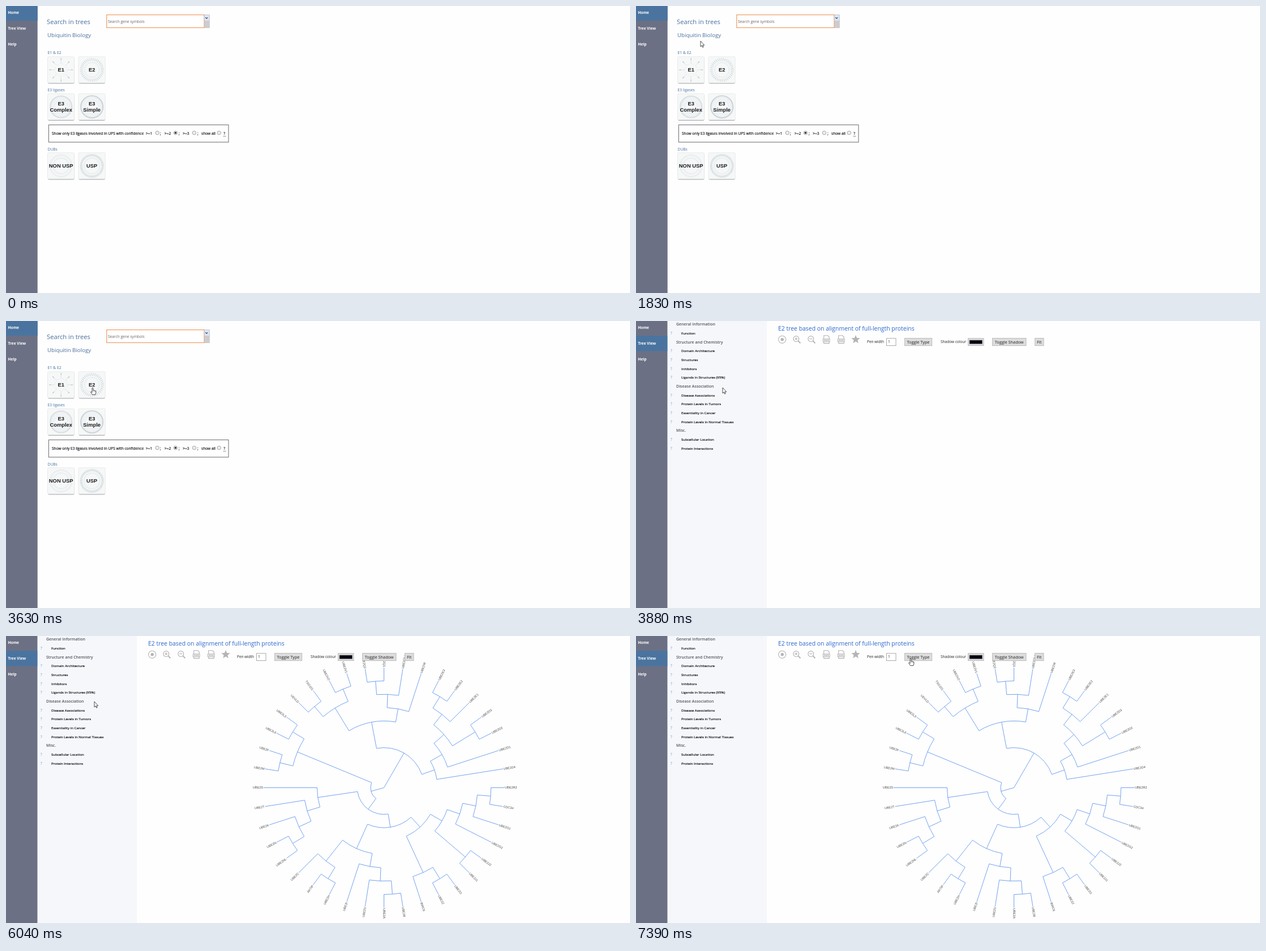
Recreate the animation shown at these times as an HTML page. Size 1102 px wide and 508 px high, loop 8 s.

```html
<!DOCTYPE html>
<html lang="en">
<head>
<meta charset="utf-8">
<title>Tree browser</title>
<style>
  html, body { margin: 0; width: 100%; height: 100%; overflow: hidden; background: #fefefe; }
  svg { display: block; width: 1102px; height: 508px; }
  text { font-family: "Open Sans", "Noto Sans", sans-serif; }
  .arial { font-family: "Liberation Sans", Arial, sans-serif; }
  .firm { stroke: #15171c; stroke-width: .18px; }
</style>
</head>
<body>
<svg id="stage" viewBox="0 0 1102 508" xmlns="http://www.w3.org/2000/svg"></svg>
<script>
const LOOP = 8000;
const BLUE = '#47709f', LINE = '#5a92ee', GREY = '#b4b4b4', INK = '#15171c';

const text = (x, y, size, fill, str, more = '') =>
  `<text x="${x}" y="${y}" font-size="${size}" fill="${fill}" ${more}>${str}</text>`;
const rect = (x, y, w, h, fill, more = '') =>
  `<rect x="${x}" y="${y}" width="${w}" height="${h}" fill="${fill}" ${more}/>`;
const ring = (x, y, r, stroke, width, more = '') =>
  `<circle cx="${x}" cy="${y}" r="${r}" fill="none" stroke="${stroke}" stroke-width="${width}" ${more}/>`;
const path = (d, stroke, width, fill = 'none', more = '') =>
  `<path d="${d}" stroke="${stroke}" stroke-width="${width}" fill="${fill}" ${more}/>`;
const group = (id, body, more = '') => `<g id="${id}" ${more}>${body}</g>`;

// Side navigation
function sidebar() {
  const items = ['Home', 'Tree View', 'Help'];
  return rect(0, 0, 55.7, 508, '#6c7084') +
    rect(0, 0, 55.7, 26, '#4a749f', 'id="active"') +
    items.map((s, i) => text(3.5, 14.2 + i * 27.8, 6.6, '#fff', s, 'font-weight="700"')).join('');
}

// Home page
function tile(x, y, lines, art) {
  const cx = x + 23.2, cy = y + 23;
  const label = lines.map((s, i) =>
    text(cx, cy + 3.3 + (i - (lines.length - 1) / 2) * 11, 9.4, '#1b1b1f', s,
      'class="arial" font-weight="700" text-anchor="middle"')).join('');
  return rect(x, y + 1, 46.5, 46.5, '#a5a8aa', 'rx="2.5"') +
    rect(x - .5, y - .3, 47.2, 46.5, '#f6f8f8', 'rx="2" stroke="#dde0e1" stroke-width=".6"') +
    art(cx, cy) + label;
}

function spokes(cx, cy) {
  let out = '';
  for (let i = 0; i < 8; i++) {
    out += `<g transform="translate(${cx} ${cy}) rotate(${i * 45})">` +
      path('M11 0H18', '#ccd5dc', .6) + path('M17.5 0H21', '#a9b4bc', 1) +
      path('M11 0A11 11 0 0 1 9.5 5.5', '#dbe2e6', .5) + '</g>';
  }
  return out;
}
const ticks = (cx, cy) =>
  ring(cx, cy, 18.5, '#cbd3d8', 5, 'stroke-dasharray="1 2.05"') +
  ring(cx, cy, 13, '#e1e8ec', 2, 'stroke-dasharray="2 1.4"');
const band = (strong, r = 19) => (cx, cy) =>
  ring(cx, cy, r, strong, 2.2) +
  ring(cx, cy, r - 3, '#e4eaee', 3, 'stroke-dasharray="1 1"') +
  ring(cx, cy, r - 7, '#edf1f4', 3);
const dashed = (color, width) => (cx, cy) =>
  ring(cx, cy, 19, color, width, 'stroke-dasharray="1 1.2"') +
  ring(cx, cy, 14, '#e4eaed', 2.5, 'stroke-dasharray="1.5 1"');

function radio(x, on) {
  return `<circle cx="${x}" cy="224.5" r="3.2" fill="#eee" stroke="#8e8e8e" stroke-width=".8"/>` +
    (on ? `<circle cx="${x}" cy="224.5" r="1.8" fill="#333"/>` : '');
}

function home() {
  const note = (x, s) => text(x, 228.4, 6.6, INK, s, 'class="firm"');
  return text(72, 32, 11.2, BLUE, 'Search in trees') +
    rect(177.8, 15.6, 172.2, 22.8, '#fff', 'stroke="#ee9c64" stroke-width="1.2"') +
    text(180, 30.4, 6.6, '#6c6468', 'Search gene symbols') +
    rect(350.5, 15.5, 8.8, 23.2, '#cfcccd', 'stroke="#bdbdc2" stroke-width=".6"') +
    rect(350.8, 16, 8, 10, '#dbe6f4') +
    path('M352.2 20.2L354.2 22.2L356.2 20.2', '#34507f', 1.3) +
    text(73, 54.8, 9.7, BLUE, 'Ubiquitin Biology') +
    text(73.5, 85.4, 6.9, BLUE, 'E1 &amp; E2') +
    text(73.5, 151.2, 6.7, BLUE, 'E3 ligases') +
    text(73.5, 255.6, 6.7, BLUE, 'DUBs') +
    tile(74, 90, ['E1'], spokes) + tile(128.5, 90, ['E2'], ticks) +
    tile(74, 155.5, ['E3', 'Complex'], band('#d9dee1')) +
    tile(128.5, 155.5, ['E3', 'Simple'], band('#cdd3d7', 19.5)) +
    tile(74, 260, ['NON USP'], dashed('#dfe4e6', 3)) +
    tile(128.5, 260, ['USP'], dashed('#c6cfd3', 4)) +
    rect(75.4, 210.4, 317.6, 30.6, '#fefefe', 'stroke="#77777c" stroke-width="1.1"') +
    note(81, 'Show only E3 ligases involved in UPS with confidence') +
    note(247, '&gt;=1') + note(272, ';') + note(280, '&gt;=2') + note(305, ';') +
    note(312.3, '&gt;=3') + note(338, ';') + note(345, 'show all') + note(384.3, '?') +
    radio(267.2) + radio(299.4, true) + radio(332.4) + radio(376.3) +
    path('M384 230.5H388.3', INK, .8, 'none', 'stroke-dasharray="1 .7"');
}

// Tree page: side panel and toolbar
function panel() {
  const rows = ['#General Information', 'Function', '#Structure and Chemistry', 'Domain Architecture',
    'Structures', 'Inhibitors', 'Ligands in Structures (95%)', '#Disease Association',
    'Disease Associations', 'Protein Levels in Tumors', 'Essentiality in Cancer',
    'Protein Levels in Normal Tissues', '#Misc.', 'Subcellular Location', 'Protein Interactions'];
  return rect(55.7, 0, 175.3, 508, '#f5f7fa') + rows.map((s, i) => {
    const y = 8.2 + i * 15.68;
    return s[0] === '#'
      ? text(71, y, 7, '#50545e', s.slice(1), 'font-weight="600"')
      : text(61, y, 6.3, '#5c8be4', '?') + text(80, y, 6.15, INK, s, 'class="firm"');
  }).join('');
}

function button(x, w, s) {
  return rect(x, 30.5, w, 13.2, '#dcdcdc', 'stroke="#b4b4b4" stroke-width=".8"') +
    text(x + w / 2, 39.7, 7.3, '#222', s, 'text-anchor="middle"');
}

function icons() {
  const at = (x, body) => `<g transform="translate(${x} 32.8)">${body}</g>`;
  const lens = sign => ring(-1.2, -1.2, 4.9, GREY, 1.2) +
    path('M2.6 2.6L6.4 6.4', GREY, 2) + path(sign, GREY, 1.1);
  const file = path('M-4.5 -1V-7H2.5L5 -4.5V-1M-4.5 4V6.8H5V4', GREY, 1.1) +
    rect(-5.9, -1, 11.8, 5, '#f2f2f2', `stroke="${GREY}" stroke-width="1"`) +
    path('M-4 1.5H4', GREY, 2, 'none', 'stroke-dasharray="2 1"');
  let star = '';
  for (let i = 0; i < 10; i++) {
    const a = i * Math.PI / 5 - Math.PI / 2, r = i % 2 ? 3.5 : 8;
    star += (i ? 'L' : 'M') + (r * Math.cos(a)).toFixed(2) + ' ' + (r * Math.sin(a)).toFixed(2);
  }
  return at(258.2, ring(0, 0, 6.6, GREY, 1.1) + `<circle r="2.7" fill="${GREY}"/>`) +
    at(284, lens('M-3.7 -1.2H1.3M-1.2 -3.7V1.3')) + at(310, lens('M-3.7 -1.2H1.3')) +
    at(336.2, file) + at(362.2, file) + at(388, path(star + 'Z', 'none', 0, GREY));
}

function toolbar() {
  return text(251, 17.4, 10.45, '#2b68cf', 'E2 tree based on alignment of full-length proteins') +
    icons() +
    text(408, 39.4, 6.45, '#222', 'Pen width') +
    rect(442.4, 30.8, 16.6, 12.8, '#fff', 'stroke="#a0a0a0" stroke-width=".9"') +
    text(445, 39.4, 6.6, '#222', '1') +
    button(474.3, 48.4, 'Toggle Type') +
    text(538, 39.4, 6.5, '#222', 'Shadow colour') +
    rect(586.4, 30.8, 27.6, 12.8, '#dcdcdc', 'stroke="#b0b0b0" stroke-width=".8"') +
    rect(589, 34, 22.4, 6.4, '#070712', 'stroke="#777" stroke-width=".6"') +
    button(629.4, 59.6, 'Toggle Shadow') + button(704.4, 15.6, 'Fit');
}

// Radial cladogram: leaves are evenly spaced, radius falls with node height
const labels = ('UBE2R2 CDC34 UBE2G1 UBE2G2 UBE2J2 UBE2J1 UBE2O UBE2Z BIRC6 UBE2B UBE2A UBE2U UBE2I UBE2H ' +
  'AKTIP UBE2C UBE2NL UBE2N UBE2K UBE2T UBE2S UBE2M UBE2F UBE2L6 UBE2L3 UEVLD TSG101 UBE2V2 UBE2V1 ' +
  'UBE2Q2 UBE2Q1 UBE2QL1 UBE2W UBE2E3 UBE2E2 UBE2E1 UBE2D3 UBE2D2 UBE2D1 UBE2D4').split(' ');
const clades = [
  [
    [
      [20, [19, [18, [17, 16]]]],
      [
        [[15, [14, 13]], [12, [11, [10, 9]]]],
        [[8, [7, 6]], [[5, 4], [3, [2, [1, 0]]]]]
      ]
    ],
    [[21, 22], [23, 24]]
  ],
  [
    [[[25, 26], [27, 28]], [[[29, 30], 31], 32]],
    [[[[[33, 34], 35], [36, 37]], 38], 39]
  ]
];

function tree() {
  const CX = 667.5, CY = 268.5, R = 212.6, DEPTH = 9;
  const point = (r, slot) => {
    const a = slot * Math.PI * 2 / labels.length;
    return (CX + r * Math.cos(a)).toFixed(2) + ' ' + (CY + r * Math.sin(a)).toFixed(2);
  };
  let d = '';
  function place(node) {
    if (!Array.isArray(node)) return { slot: node, h: 0, r: R };
    const kids = node.map(place).sort((a, b) => a.slot - b.slot);
    const h = 1 + Math.max(...kids.map(k => k.h));
    const r = R * (1 - h / DEPTH);
    const [a, b] = kids;
    if (r > 0) d += `M${point(r, a.slot)}A${r} ${r} 0 0 1 ${point(r, b.slot)}`;
    for (const k of kids) d += `M${point(r, k.slot)}L${point(k.r, k.slot)}`;
    return { slot: (a.slot + b.slot) / 2, h, r };
  }
  place(clades);
  const names = labels.map((s, i) => {
    const deg = i * 360 / labels.length, flip = deg > 90 && deg <= 270;
    const turn = `translate(${CX} ${CY}) rotate(${flip ? deg - 180 : deg})`;
    return text(flip ? -R - 1 : R + 1, 1.9, 5.5, '#484848', s,
      `class="arial" transform="${turn}" text-anchor="${flip ? 'end' : 'start'}"`);
  }).join('');
  return path(d, LINE, .85) + names;
}

// Pointer and tooltip
const arrow = path('M0 0V10L2.2 7.9L3.8 11.2L5.2 10.5L3.8 7.3H6.7Z', '#222', .8, '#fff');
const hand = path('M-1 1C-1 -.4 1 -.4 1 1V4.8L2.4 4.6L2.9 5.1L4.2 5L4.7 5.6L5.8 6V9L4.8 12.4H-.5' +
  'L-3.3 8.4C-3.8 7.2 -2.6 6.8 -2 7.5L-1 8.6Z', '#222', .8, '#fff') +
  path('M1 4.8V7M2.9 5.1V7.2M4.7 5.6V7.4', '#444', .5);

document.getElementById('stage').innerHTML =
  '<clipPath id="below"><rect x="231" y="34.5" width="871" height="474"/></clipPath>' +
  rect(0, 0, 1102, 508, '#fefefe') + sidebar() +
  group('home', home()) +
  group('view', panel() + group('tree', tree(), 'clip-path="url(#below)"') + toolbar()) +
  group('tip', rect(161.4, 127.6, 22.4, 14.2, '#eaf2fc', 'rx="1" stroke="#8aa2c6" stroke-width="1"') +
    text(164.5, 137.2, 6.2, '#566070', 'E2')) +
  group('click', '<circle cx="152" cy="118" r="6.5" fill="#888" fill-opacity=".22"/>') +
  group('pointer', group('arrow', arrow) + group('hand', hand));

const $ = Object.fromEntries(
  ['active', 'home', 'view', 'tree', 'tip', 'click', 'pointer', 'arrow', 'hand']
    .map(id => [id, document.getElementById(id)]));

// Pointer moves: start time, step length, then [step, x, y]
const moves = [
  { start: 1380, step: 63.1, keys: [[0, 48, 2], [3, 72, 23], [7, 114, 62], [10, 149, 94],
    [12, 166, 109], [14, 148, 116], [16, 153, 118]] },
  { start: 6040, step: 64.25, keys: [[0, 156, 116], [2, 180, 113], [4, 223, 108], [8, 327, 98],
    [12, 411, 91], [15, 452, 69], [18, 476, 49], [21, 485, 40]] }
];

function pointerAt(t) {
  const move = moves.filter(m => t >= m.start).pop();
  if (!move) return null;
  const { keys } = move, last = keys[keys.length - 1];
  const n = Math.floor((t - move.start) / move.step + 1e-6);
  if (n >= last[0]) return last.slice(1);
  const i = keys.findIndex(k => k[0] > n);
  const [n0, x0, y0] = keys[i - 1], [n1, x1, y1] = keys[i];
  const f = (n - n0) / (n1 - n0);
  return [x0 + (x1 - x0) * f, y0 + (y1 - y0) * f];
}

const show = (el, on) => el.setAttribute('visibility', on ? 'visible' : 'hidden');

function draw(t) {
  const inTree = t >= 3880;
  show($.home, !inTree);
  show($.view, inTree);
  show($.tree, t >= 3950);
  show($.tip, t >= 2390 && t < 3450);
  show($.click, t >= 3450 && t < 3630);
  $.active.setAttribute('y', inTree ? 26 : 0);
  $.active.setAttribute('height', inTree ? 27.4 : 26);

  const p = pointerAt(t);
  $.pointer.style.display = p ? '' : 'none';
  if (!p) return;
  const [x, y] = p;
  const link = inTree
    ? x > 474 && x < 523 && y < 44
    : x > 128 && x < 175 && y > 90;
  show($.arrow, !link);
  show($.hand, link);
  $.pointer.setAttribute('transform', `translate(${x} ${y})`);
}

const began = performance.now();
function frame() {
  draw((performance.now() - began) % LOOP);
  requestAnimationFrame(frame);
}
frame();
</script>
</body>
</html>
```
